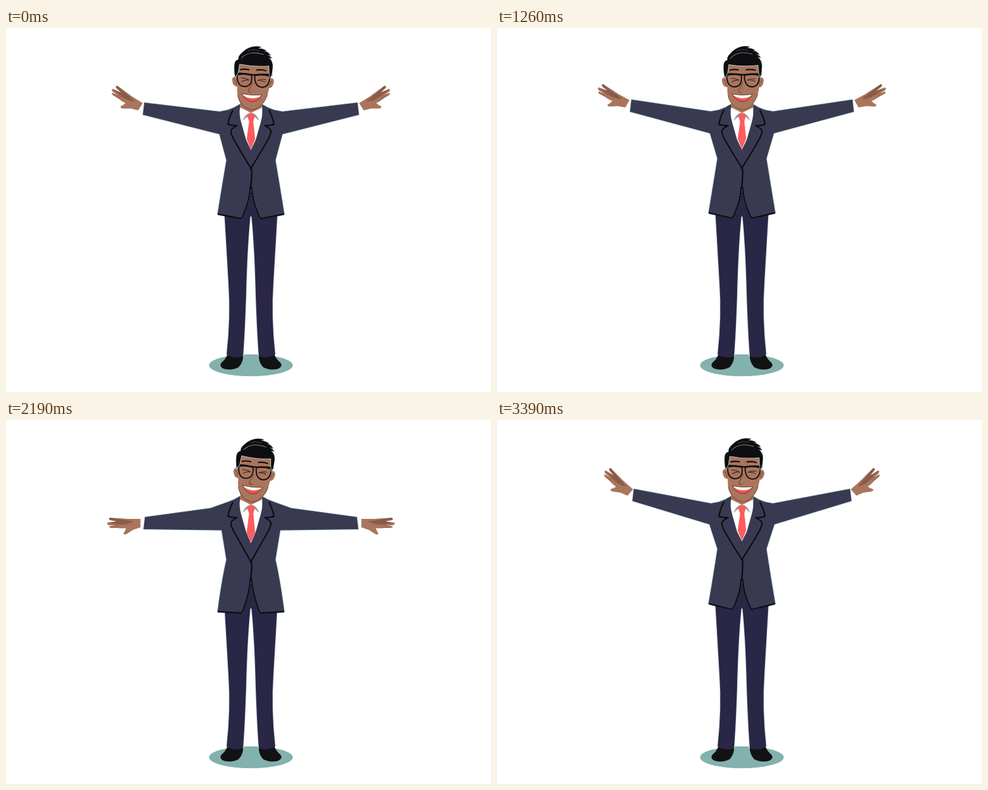
An HTML page with a canvas for the animation above (3.42 s loop, 800 px wide and 600 px high).

```html
<!DOCTYPE html>
<html lang="en">
<head>
<meta charset="utf-8">
<title>Arm swing</title>
<style>
html, body { margin: 0; width: 100%; height: 100%; overflow: hidden; background: #fff; }
canvas { display: block; }
</style>
</head>
<body>
<canvas id="stage" width="800" height="600"></canvas>
<script>
const ctx = document.getElementById('stage').getContext('2d');
const LOOP = 3420, TICK = 30, CYCLE = 19;
const JACKET = '#393a52', TROUSERS = '#2a2645', SKIN = '#aa755d', SHADE = '#8a5b48';
const CREASE = '#70483b', BLACK = '#0e0e10', FRINGE = '#c4e4e2';

// Poses of one swing: keys are steps within the cycle.
const KEYS = [0, 3, 4, 7, 10, 13, 14, 16, 18];
const POSES = {
  sleeveX: [227, 229.5, 228, 222, 217, 218, 219, 220.5, 224.5],
  sleeveY: [133, 159, 170, 186, 164, 141, 137, 128, 123.5],
  hand: [32, 9, 0, -15, -2, 16, 20, 29, 41],
  hem: [307, 314, 316, 320, 317, 311, 309, 305, 303],
  tilt: [2.3, 4.6, 4.8, 4.2, 1.8, 0, -0.2, 0, 1.3]
};

// Periodic cubic through the keys.
function sample(values, step) {
  const n = KEYS.length;
  const at = i => KEYS[(i + n) % n] + CYCLE * Math.floor(i / n);
  const val = i => values[(i + n) % n];
  const slope = i => (val(i + 1) - val(i - 1)) / (at(i + 1) - at(i - 1));
  let k = 0;
  while (k < n - 1 && KEYS[k + 1] <= step) k++;
  const span = at(k + 1) - at(k), u = (step - at(k)) / span;
  const v = 1 - u;
  return val(k) * (1 + 2 * u) * v * v + val(k + 1) * u * u * (3 - 2 * u)
    + span * u * v * (slope(k) * v - slope(k + 1) * u);
}

function fill(color, d) {
  ctx.fillStyle = color;
  ctx.fill(new Path2D(d));
}

function line(color, width, d) {
  ctx.strokeStyle = color;
  ctx.lineWidth = width;
  ctx.stroke(new Path2D(d));
}

function bothSides(draw) {
  draw();
  ctx.save();
  ctx.translate(808, 0);
  ctx.scale(-1, 1);
  draw();
  ctx.restore();
}

function drawGround() {
  ctx.fillStyle = '#82b1ae';
  ctx.beginPath();
  ctx.ellipse(404, 556, 69, 18, 0, 0, 7);
  ctx.fill();
}

function drawLegs() {
  const leg = 'M360 300 Q363 350 367 420 Q371 475 364 538 Q376 546 391 541 ' +
    'Q394 500 396 440 Q398 360 403 311 L406 308 L406 255 L385 255Z';
  bothSides(() => line(FRINGE, 2, leg));
  bothSides(() => {
    fill('#121214', 'M365 539 Q362 546 356 551 Q350 558 360 562 Q373 565 384 559 Q392 550 391 538Z');
    fill(TROUSERS, leg);
  });
}

function drawHand(p) {
  const angle = p.hand * Math.PI / 180;
  ctx.save();
  ctx.translate(p.sleeveX - 6.2 * Math.cos(angle), p.sleeveY - 6.2 * Math.sin(angle));
  ctx.rotate(angle);
  fill('#fff', 'M-1 -9 L8 -9 L8 10 L-1 10Z');
  fill(SKIN, 'M0 -7 L-20 -7 L-50 -9 Q-54 -7 -50 -5 L-39 -3 L-54 -1 Q-57 2 -52 3 ' +
    'L-40 3 L-51 5 Q-53 8 -47 8 L-38 8 Q-29 9 -24 8 Q-25 13 -28 17 Q-27 20 -23 18 L-12 11 L0 7Z');
  fill(SHADE, 'M-11 -3 L-31 -6 L-50 -9 Q-54 -7 -50 -5 L-39 -3 L-53 0 L-36 2 Q-23 4 -11 -3Z');
  line(SHADE, 0.8, 'M-52 3 L-36 3 M-49 6 L-36 6');
  ctx.restore();
}

function drawJacket(p) {
  const { sleeveX: x, sleeveY: y, hem } = p;
  const drop = hem - 307;
  const bendX = 353 - ((y - 123) / 12) ** 2;
  const bendY = 137.5 + (353 - bendX) * 0.5;
  const low = 314 + 0.45 * drop;
  const edge = `Q390 ${low} 392 ${low - 7} Q402 283 403 262`;
  const outline = `M406 128 L385 126 Q376 132 366 135 L${bendX} ${bendY}
    L${x + 1.2} ${y - 10} L${x - 1.2} ${y + 10} L${352 + 0.4 * drop} ${175 + 0.75 * drop}
    L363.5 ${218 + 1.35 * drop} Q356 262 349 ${hem - 1} L386 ${low} ${edge} L406 262Z`;
  bothSides(() => line(FRINGE, 2, outline));
  bothSides(() => {
    fill(JACKET, outline);
    line(BLACK, 2.4, `M350 ${hem} L386 ${low} ${edge}`);
  });
}

function drawShirt(drop) {
  const tip = 200 + 0.25 * drop, button = 232 + 0.3 * drop;
  fill('#fff', `M386 131 Q384 142 388 156 L396 184 L404 ${tip + 1} L412 184 L420 156 Q424 142 422 131Z`);
  fill(SKIN, 'M387 112 L386 132 Q395 136 404 140 Q414 136 423 132 L422 112Z');
  fill('#fff', 'M386 131 Q395 135 404 140 Q414 135 423 131 L418 153 L404 140 L390 153Z');
  fill('#9b9b9d', 'M390 153 Q395 141 404 139 Q413 141 418 153 L407 144 L401 144Z');
  fill('#ff5c5e', `M397 143 Q404 139 411 143 L408 154 L411 ${tip - 17} L404 ${tip} L397 ${tip - 17} L401 154Z`);
  bothSides(() => line(BLACK, 2.4, `M374 136 Q368 147 366 159 Q373 161 381 161
    Q373 165 371 169 Q370 174 377 186 Q389 207 404.5 ${button}`));
  line(BLACK, 2.4, `M405 ${button} Q406 247 403 264`);
}

function drawFace() {
  fill(SKIN, 'M381 82 Q371 79 371 87 Q372 98 381 98Z M432 82 Q440 79 440 88 Q438 99 431 98Z');
  line(CREASE, 1, 'M374 86 Q378 87 378 94 M437 86 Q434 88 433 94');
  fill(SKIN, 'M379 56 L380 106 Q382 121 390 128 Q404 141 417 130 Q429 120 432 101 L434 56Z');
  line(CREASE, 1, 'M381 111 Q383 121 390 128 Q404 140 417 130 Q427 121 430 109');

  line(BLACK, 2.2, 'M384 69.5 Q391 67.5 398 69 M411 69 Q418 67.5 426 69.5');
  line('#3a2822', 1.2, 'M386 83 Q394 83 399 86 M387 89 Q393 85 399 86 M413 86 Q419 83 426 84 M413 86 Q420 85 425 88');
  line(BLACK, 1.9, 'M379 78 Q391 75 403 78 Q405 96 392 97 Q379 97 379 78Z ' +
    'M408 78 Q421 75 433 78 Q433 97 420 97 Q408 96 408 78Z');
  line(BLACK, 2.4, 'M375 76 Q389 75 403 77 L409 77 Q422 75 436 76');
  line(CREASE, 1.2, 'M405 89 Q401 99 398 104 Q400 107 404 106');

  const lips = 'M388 109 Q404 112 421 109.5 Q416 121 405 121.5 Q393 120 388 109Z';
  fill('#f4544f', lips);
  fill('#fff', 'M388 109 Q404 112 421 109.5 Q417 115 405 116 Q393 115 388 109Z');
  line('#4a2c26', 0.8, lips);
}

function drawHair() {
  const hair = 'M376 82 Q373 70 374 60 Q375 54 380 53 Q379 47 386 41 Q392 34 402 31 ' +
    'Q410 29 417 31 L412 33 Q421 33 426 37 L421 37 Q429 38 433 44 L427 43 ' +
    'Q433 45 435 49 L430 48 Q437 53 437 63 Q437 73 434 82 L432 74 L431 61 ' +
    'Q407 64 382 60 L380 75Z';
  line(FRINGE, 1.5, hair);
  fill(BLACK, hair);
  line('#77777c', 1.2, 'M385 50 Q391 43 402 41 Q411 40 421 43');
  line('#55555b', 0.8, 'M395 38 Q404 34 413 37');
}

function drawHead(tilt) {
  ctx.save();
  ctx.translate(404, 136);
  ctx.rotate(tilt * Math.PI / 180);
  ctx.translate(-404, -136);
  drawFace();
  drawHair();
  ctx.restore();
}

function drawScene(step) {
  const pose = {};
  for (const name in POSES) pose[name] = sample(POSES[name], step);
  ctx.fillStyle = '#fff';
  ctx.fillRect(0, 0, 800, 600);
  ctx.lineCap = ctx.lineJoin = 'round';
  drawGround();
  drawLegs();
  bothSides(() => drawHand(pose));
  drawJacket(pose);
  drawShirt(pose.hem - 307);
  drawHead(pose.tilt);
}

// Five drawings span six ticks: the third one is held twice.
function stepAt(ms) {
  const tick = Math.floor((ms % LOOP) / TICK);
  const drawing = Math.floor(tick / 6) * 5 + [0, 1, 2, 2, 3, 4][tick % 6];
  return drawing % CYCLE;
}

const start = performance.now();
function loop() {
  drawScene(stepAt(performance.now() - start));
  requestAnimationFrame(loop);
}
loop();
</script>
</body>
</html>
```
